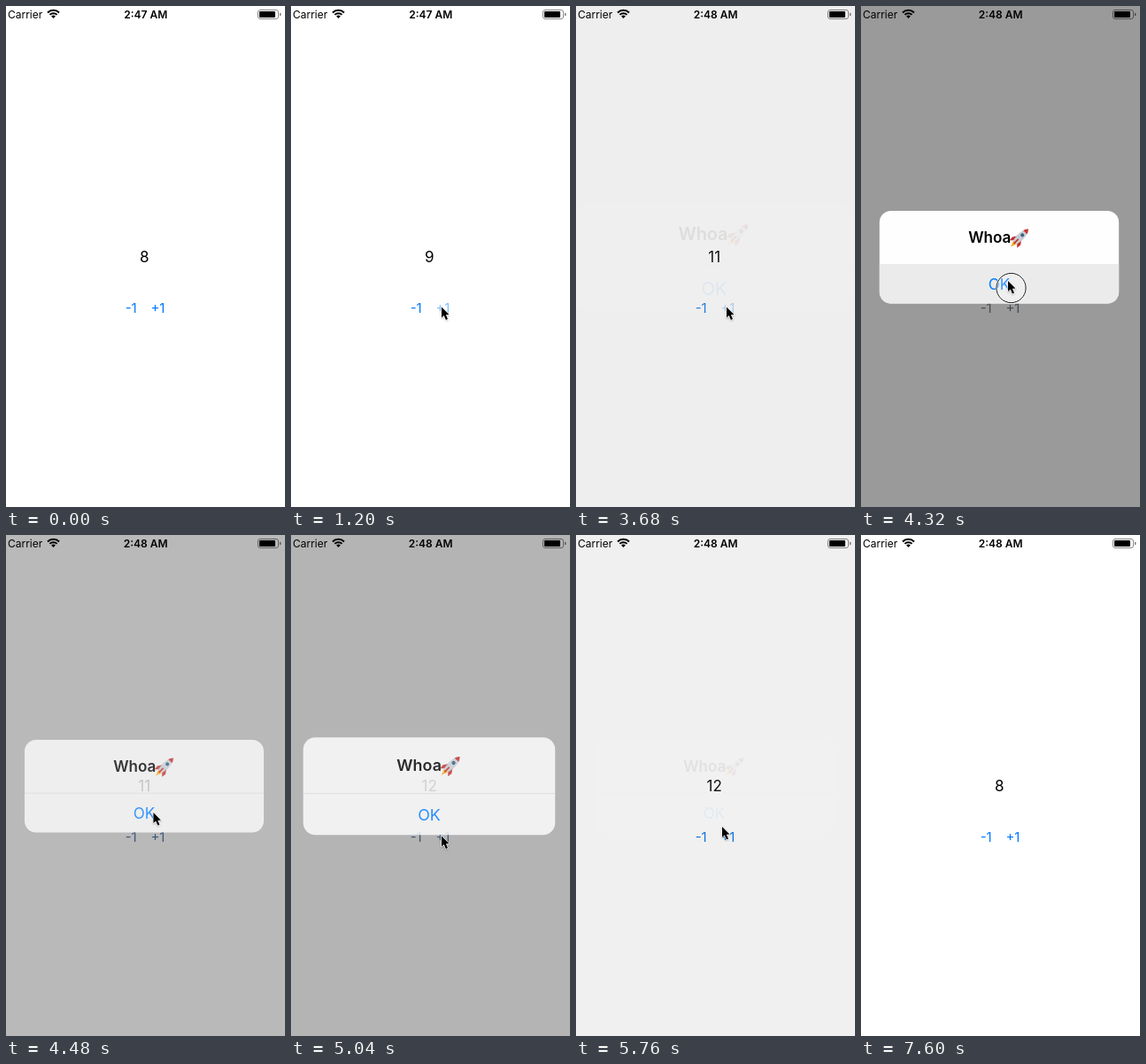
An HTML page with a canvas that plays this animation: 315x565 px, repeating every 8.08 s.

```html
<!DOCTYPE html>
<html lang="en">
<head>
<meta charset="utf-8">
<title>Counter</title>
<style>
html, body { margin: 0; width: 100%; height: 100%; overflow: hidden; background: #fff; }
canvas { display: block; width: 315px; height: 565px; }
</style>
</head>
<body>
<canvas id="stage"></canvas>
<script>
const W = 315, H = 565, LOOP = 8080, STEP = 80;
const HOLD = 120, GAP = 280, FADE = 300, MINUTE = 2480, EXIT = 7600;
const canvas = document.getElementById('stage');
const ctx = canvas.getContext('2d');
const ratio = window.devicePixelRatio || 1;
canvas.width = W * ratio;
canvas.height = H * ratio;

// where the pointer tip rests; delta is what a tap there adds
const entry = { x: 219, y: 479 };
const plus = { x: 170, y: 339.5, delta: 1 };
const minus = { x: 141, y: 339, delta: -1 };
const ok = { x: 166, y: 310, delta: 0 };
const between = { x: 165, y: 329 };
const exit = { x: 155, y: 539 };

const moves = [], taps = [], alerts = [];
let spot = entry, clock = 240, count = 8;

function go(to, start, time) {
  moves.push({ from: spot, to, start, time });
  spot = to;
  clock = start + time;
}

// a tap counts on release; a count above ten opens the alert
function tap(down, times = 1) {
  for (let i = 0; i < times; i++, down += GAP) {
    const up = down + HOLD;
    count += spot.delta;
    taps.push({ down, up, spot, count });
    if (spot === plus && count > 10) alerts.push({ open: up, close: Infinity });
    if (spot === ok) alerts[alerts.length - 1].close = up;
  }
}

go(plus, clock, 560);
tap(960);
go(minus, 1440, 280);
tap(1760, 2);
go(plus, 2240, 160);
tap(2650, 4);
go(ok, 3800, 360);
tap(4280);
go(plus, 4440, 200);
tap(4670);
go(ok, 5080, 200);
tap(5400);
go(between, 5560, 200);
go(minus, clock, 240);
tap(6120, 4);
go(exit, 7100, 420);

const smooth = v => { v = Math.max(0, Math.min(1, v)); return v * v * (3 - 2 * v); };
const mix = (a, b, k) => a + (b - a) * k;
const settle = v => v < 0 ? 0 : 1 - (1 + v) * Math.exp(-v);
const lastOf = (list, test) => list.filter(test).pop();

function pointerAt(t) {
  const m = lastOf(moves, m => t >= m.start);
  if (!m || t >= EXIT) return null;
  const k = smooth((t - m.start) / m.time);
  return { x: mix(m.from.x, m.to.x, k), y: mix(m.from.y, m.to.y, k) };
}

function countAt(t) {
  const last = lastOf(taps, p => t >= p.up);
  return last ? last.count : 8;
}

function buttonAlpha(t, button) {
  const last = lastOf(taps, p => p.spot === button && t >= p.down);
  return last ? mix(0.2, 1, smooth((t - last.up) / FADE)) : 1;
}

function alertAt(t) {
  const a = lastOf(alerts, a => t >= a.open);
  if (!a) return { dim: 0, scale: 1 };
  const p = settle((t - a.open) * 0.0104);
  const left = 1 - settle(t > a.close ? (t - a.close) * 0.014 : 0);
  return { dim: left < 0.015 ? 0 : p * left, scale: mix(1.2, 1, p) };
}

function text(str, x, y, size, color, weight = 400, align = 'center') {
  ctx.font = `${weight} ${size}px Inter, Roboto, sans-serif`;
  ctx.textAlign = align;
  ctx.fillStyle = color;
  ctx.fillText(str, x, y);
}

function fillBox(x, y, w, h, r, color) {
  ctx.fillStyle = color;
  ctx.beginPath();
  ctx.roundRect(x, y, w, h, r);
  ctx.fill();
}

function circle(x, y, r) {
  ctx.beginPath();
  ctx.arc(x, y, r, 0, Math.PI * 2);
}

function fillPath(d, color) {
  ctx.fillStyle = color;
  ctx.fill(new Path2D(d));
}

function statusBar(t) {
  text('Carrier', 2, 13.6, 12, '#000', 400, 'left');
  text(t < MINUTE ? '2:47 AM' : '2:48 AM', 157.7, 13.6, 12, '#000', 600);

  ctx.strokeStyle = '#000';
  for (const r of [1.7, 5.8, 9.2]) {
    ctx.lineWidth = r < 2 ? 3.4 : 2;
    ctx.beginPath();
    ctx.arc(53.5, 14, r, -Math.PI * 0.75, -Math.PI * 0.25);
    ctx.stroke();
  }

  ctx.strokeStyle = '#888';
  ctx.lineWidth = 1;
  ctx.beginPath();
  ctx.roundRect(284.5, 4.5, 23, 10, 2.5);
  ctx.stroke();
  fillBox(286, 6, 18, 7, 1, '#000');
  fillBox(309, 7.7, 1.4, 3.6, 0.7, '#777');
}

// drawn nose up, then turned
function rocket(x, y) {
  ctx.save();
  ctx.translate(x, y);
  ctx.rotate(Math.PI / 4);
  fillPath('M-2.6 7 H2.6 L0 14 Z', '#f5a623');
  for (const side of [1, -1]) {
    ctx.scale(side, 1);
    fillPath('M3 0 L6.5 5 L6 10 L2.5 6.5 Z', '#bd3031');
  }
  fillPath('M0 -14 C4 -10 5 -2 3 7 H-3 C-5 -2 -4 -10 0 -14 Z', '#c5ccd2');
  fillPath('M0 -14 Q2.5 -11 3 -9 H-3 Q-2.5 -11 0 -14 Z', '#c9332f');
  ctx.fillStyle = '#3e5f80';
  circle(0, -4.5, 2);
  ctx.fill();
  fillBox(-0.8, 2, 1.6, 7, 0, '#c9332f');
  ctx.restore();
}

function drawAlert({ dim, scale }, held) {
  const cx = 156, cy = 283.3;
  ctx.save();
  ctx.globalAlpha = smooth(dim);
  ctx.translate(cx, cy);
  ctx.scale(scale, scale);
  ctx.translate(-cx, -cy);
  fillBox(21, 231, 270, 104.5, 13, '#fefefe');
  if (held) fillBox(21, 291, 270, 44.5, [0, 0, 13, 13], '#ebebeb');
  else fillBox(21, 290.8, 270, 0.8, 0, '#d4d4d6');
  text('Whoa', 121.2, 267, 17, '#000', 600, 'left');
  rocket(179, 261.5);
  text('OK', cx, 320, 17, '#007aff');
  ctx.restore();
}

function drawPointer({ x, y }, down) {
  ctx.save();
  ctx.translate(x, y);
  if (down) {
    circle(3.5, 8, 16.6);
    ctx.fillStyle = 'rgba(255,255,255,.2)';
    ctx.fill();
    for (const [color, width] of [['#fff', 2.4], ['#111', 1]]) {
      ctx.strokeStyle = color;
      ctx.lineWidth = width;
      ctx.stroke();
    }
  }
  const arrow = 'M0 0 V12 L2.7 9.5 L4.9 14.5 L7 13.6 L4.9 8.8 L8.5 8.6 Z';
  ctx.shadowColor = 'rgba(0,0,0,.25)';
  ctx.shadowBlur = 2 * ratio;
  ctx.shadowOffsetY = ratio;
  ctx.lineJoin = 'round';
  ctx.lineWidth = 1.2;
  ctx.strokeStyle = '#fff';
  ctx.stroke(new Path2D(arrow));
  ctx.shadowColor = 'transparent';
  fillPath(arrow, '#000');
  ctx.restore();
}

function drawButton(t, label, x, button, dim) {
  const tint = [[0, 120], [122, 124], [255, 130]].map(([a, b]) => Math.round(mix(a, b, dim)));
  ctx.globalAlpha = buttonAlpha(t, button);
  text(label, x, 346.3, 15, `rgb(${tint})`);
  ctx.globalAlpha = 1;
}

function draw(t) {
  const alert = alertAt(t), tip = pointerAt(t);
  const press = taps.find(p => t >= p.down && t < p.up);
  ctx.setTransform(ratio, 0, 0, ratio, 0, 0);
  fillBox(0, 0, W, H, 0, '#fff');
  statusBar(t);
  text(countAt(t), 156.2, 289.2, 17, '#000');
  drawButton(t, '-1', 141.2, minus, alert.dim);
  drawButton(t, '+1', 171.4, plus, alert.dim);
  if (alert.dim > 0) {
    fillBox(0, 0, W, H, 0, `rgba(0,0,0,${0.4 * alert.dim})`);
    drawAlert(alert, press && press.spot === ok);
  }
  if (tip) drawPointer(tip, press);
}

const start = performance.now();
function tick() {
  const t = (performance.now() - start) % LOOP;
  draw(Math.floor(t / STEP) * STEP);
  requestAnimationFrame(tick);
}
tick();
</script>
</body>
</html>
```
